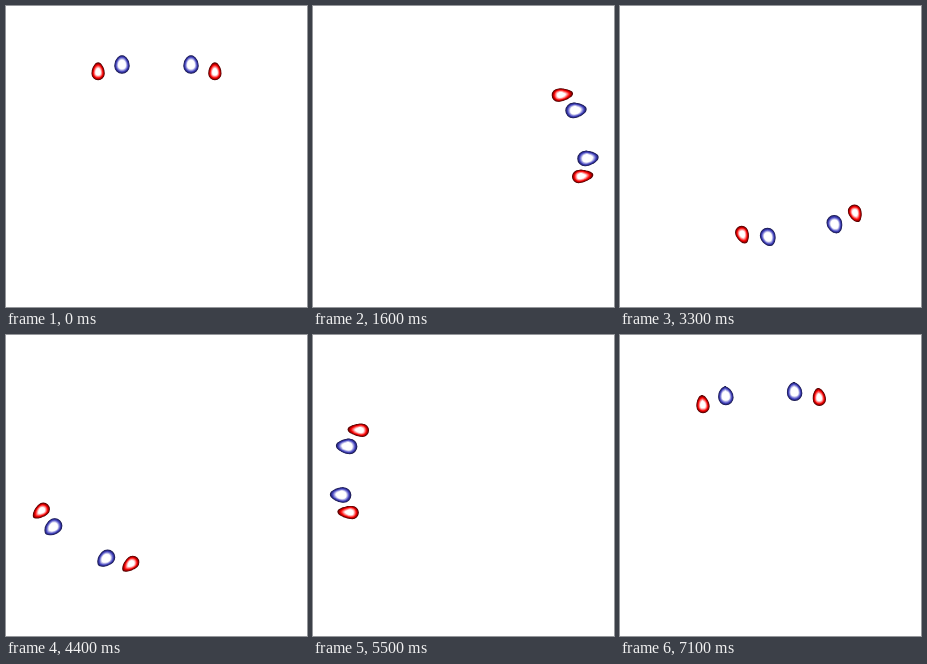
Animation of 301x301 px, one loop 7.2 s. Source, as an HTML page with a canvas:

```html
<!DOCTYPE html>
<html lang="en">
<head>
<meta charset="utf-8">
<title>Circling drops</title>
<style>
  html, body { margin: 0; width: 100%; height: 100%; overflow: hidden; background: #fff; }
  canvas { display: block; }
</style>
</head>
<body>
<canvas id="stage" width="301" height="301"></canvas>
<script>
const ctx = document.getElementById('stage').getContext('2d');
const TAU = 2 * Math.PI;
const TILT = Math.SQRT1_2; // the ring is seen from 45 degrees above
const CENTER_X = 150.5, CENTER_Y = 143, RING = 125.2;
const STEPS = 72, STEP_MS = 100;
const LAYERS = 18, BALLS = 18;
const HALF_LENGTH = 10.8, TIP_RADIUS = 2.4;

// spread: angle in degrees to either side of the middle; glow: depth where white begins
const KINDS = [
  { spread: 27.8, radius: 6.6, hue: 0, saturation: 100, rim: 15, glow: 0.6 },
  { spread: 16, radius: 7.7, hue: 240, saturation: 50, rim: 20, glow: 0.5 },
];

// A drop is a row of shrinking balls; inner layers contract towards its blunt end.
function drawDrop(x, y, dx, dy, { radius, hue, saturation, rim, glow }) {
  const blunt = radius - HALF_LENGTH;
  const tip = HALF_LENGTH - TIP_RADIUS;
  const focus = blunt + 2.3;
  for (let k = 0; k < LAYERS; k++) {
    const depth = k / LAYERS;
    const light = rim + (100 - rim) * Math.min(1, depth / glow);
    ctx.fillStyle = `hsl(${hue}, ${saturation}%, ${light}%)`;
    ctx.beginPath();
    for (let j = 0; j <= BALLS; j++) {
      const v = j / BALLS;
      const s = (blunt + (tip - blunt) * v) * (1 - depth) + focus * depth;
      const r = (radius - (radius - TIP_RADIUS) * v * v) * (1 - depth);
      const px = x + dx * s, py = y + dy * s;
      ctx.moveTo(px + r, py);
      ctx.arc(px, py, r, 0, TAU);
    }
    ctx.fill();
  }
}

function draw(now) {
  const turn = Math.floor(now / STEP_MS) % STEPS / STEPS * TAU;
  ctx.clearRect(0, 0, 301, 301);
  for (const kind of KINDS) {
    for (const side of [-1, 1]) {
      const angle = turn + side * kind.spread * TAU / 360;
      drawDrop(CENTER_X + RING * Math.sin(angle),
               CENTER_Y - RING * TILT * Math.cos(angle),
               Math.sin(turn), -TILT * Math.cos(turn), kind);
    }
  }
}

const start = performance.now();
function tick() {
  draw(performance.now() - start);
  requestAnimationFrame(tick);
}
tick();
</script>
</body>
</html>
```
